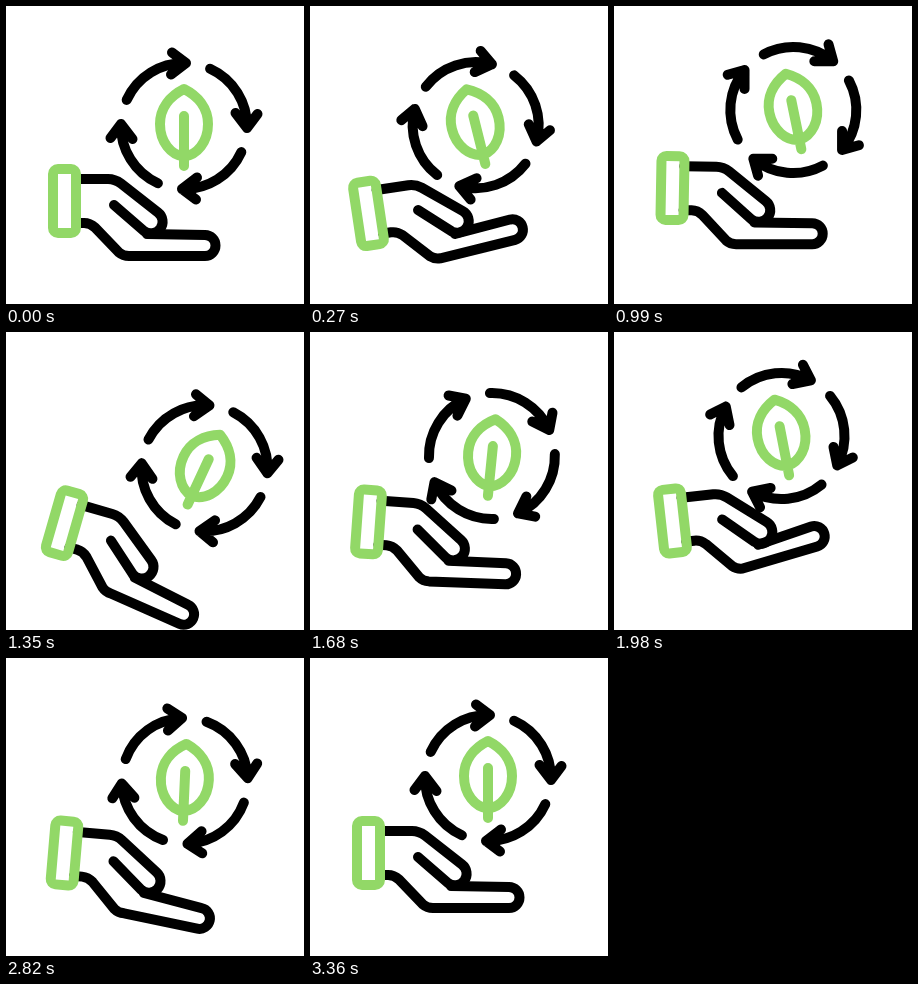
An HTML page for the animation above (3.6 s loop, 298 by 298 pixels).

```html
<!DOCTYPE html>
<html lang="en">
<head>
<meta charset="utf-8">
<title>Renewable care</title>
<style>
  html, body { margin: 0; width: 100%; height: 100%; overflow: hidden; background: #fff; }
  svg { display: block; width: 100vw; height: 100vh; }
  g { fill: none; stroke: #000; stroke-width: 10; stroke-linecap: round; stroke-linejoin: round; }
  .green { stroke: #92d867; }
</style>
</head>
<body>
<svg viewBox="0 0 298 298">
  <defs>
    <path id="arrow" d="M-57.3-26.1A63 63 0 0 1 2-63M-13-51.5L2-63L-12-73.5"/>
  </defs>
  <g id="hand">
    <path d="M70 173H102Q109 173 115 177.5L152 206.5A11.5 11.5 0 0 1 138 225L108 199"/>
    <path id="finger"/>
    <rect class="green" x="47" y="163" width="23" height="64" rx="5"/>
  </g>
  <g id="ring">
    <use href="#arrow"/>
    <use href="#arrow" transform="rotate(90)"/>
    <use href="#arrow" transform="rotate(180)"/>
    <use href="#arrow" transform="rotate(270)"/>
  </g>
  <g id="leaf" class="green">
    <path d="M0-37C14-30 24-18 24-2C24 16 13 29 0 30.5C-13 29-24 16-24-2C-24-18-14-30 0-37ZM0-10V40"/>
  </g>
</svg>
<script>
const LOOP = 3600, STEP = 30;

// time, ring x, ring y, ring spin, leaf angle, hand y, hand tilt, finger bend
const keys = [
  [0,    178,   120,   0,     0,     195, 0,    0],
  [540,  153.3, 117.2, 41,    -28,   220, -17,  -11],
  [990,  179.3, 104,   127.5, -11.6, 182, 1,    -1],
  [1350, 198.5, 136.3, 182.7, 25,    191, 16,   8],
  [1980, 167.5, 104,   296,   -11,   189, -6.3, -10.5],
  [2190, 173,   88,    322,   -8,    190, -3.5, -4.5],
  [2400, 180,   112.5, 343,   -1.5,  193, 1,    5],
  [2610, 185,   122,   351.5, 4,     195, 6.5,  9.5],
  [2760, 179,   123,   355,   3,     195, 5.5,  8],
  [3240, 178,   120,   359.3, 0,     195, 0,    0],
  [3360, 178,   120,   360,   0,     195, 0,    0]
];

const secant = (i, c) => (keys[i + 1][c] - keys[i][c]) / (keys[i + 1][0] - keys[i][0]);

// Flat at turning points, harmonic mean of the neighbours elsewhere
function slope(i, c) {
  if (i === 0 || i === keys.length - 1) return 0;
  const a = secant(i - 1, c), b = secant(i, c);
  return a * b > 0 ? 2 * a * b / (a + b) : 0;
}

function sample(t, c) {
  const last = keys.length - 1;
  if (t >= keys[last][0]) return keys[last][c];
  let i = 0;
  while (t >= keys[i + 1][0]) i++;
  const h = keys[i + 1][0] - keys[i][0], u = (t - keys[i][0]) / h, v = 1 - u;
  return v * v * (1 + 2 * u) * keys[i][c] + u * u * (3 - 2 * u) * keys[i + 1][c]
    + h * u * v * (v * slope(i, c) - u * slope(i + 1, c));
}

function fingerPath(bend) {
  const a = bend * Math.PI / 180, cos = Math.cos(a), sin = Math.sin(a);
  const tip = (x, y) => {
    const dx = x - 125, dy = y - 240;
    return (125 + dx * cos - dy * sin).toFixed(2) + ' ' + (240 + dx * sin + dy * cos).toFixed(2);
  };
  return `M141 228L${tip(199, 229)}A10.5 10.5 0 0 1 ${tip(199, 250)}` +
    'L123 250Q117 250 113 246.5L89 221.5Q84 217 78 217H70';
}

const [hand, finger, ring, leaf] =
  ['hand', 'finger', 'ring', 'leaf'].map(id => document.getElementById(id));

function draw(t) {
  const [x, y, spin, sway, handY, tilt, bend] = [1, 2, 3, 4, 5, 6, 7].map(c => sample(t, c));
  ring.setAttribute('transform', `translate(${x} ${y}) rotate(${spin})`);
  leaf.setAttribute('transform', `translate(${x} ${y}) rotate(${sway})`);
  hand.setAttribute('transform', `translate(58 ${handY}) rotate(${tilt}) translate(-58 -195)`);
  finger.setAttribute('d', fingerPath(bend));
}

const start = performance.now();
function tick() {
  const t = (performance.now() - start) % LOOP;
  draw(Math.floor(t / STEP) * STEP);
  requestAnimationFrame(tick);
}
tick();
</script>
</body>
</html>
```
